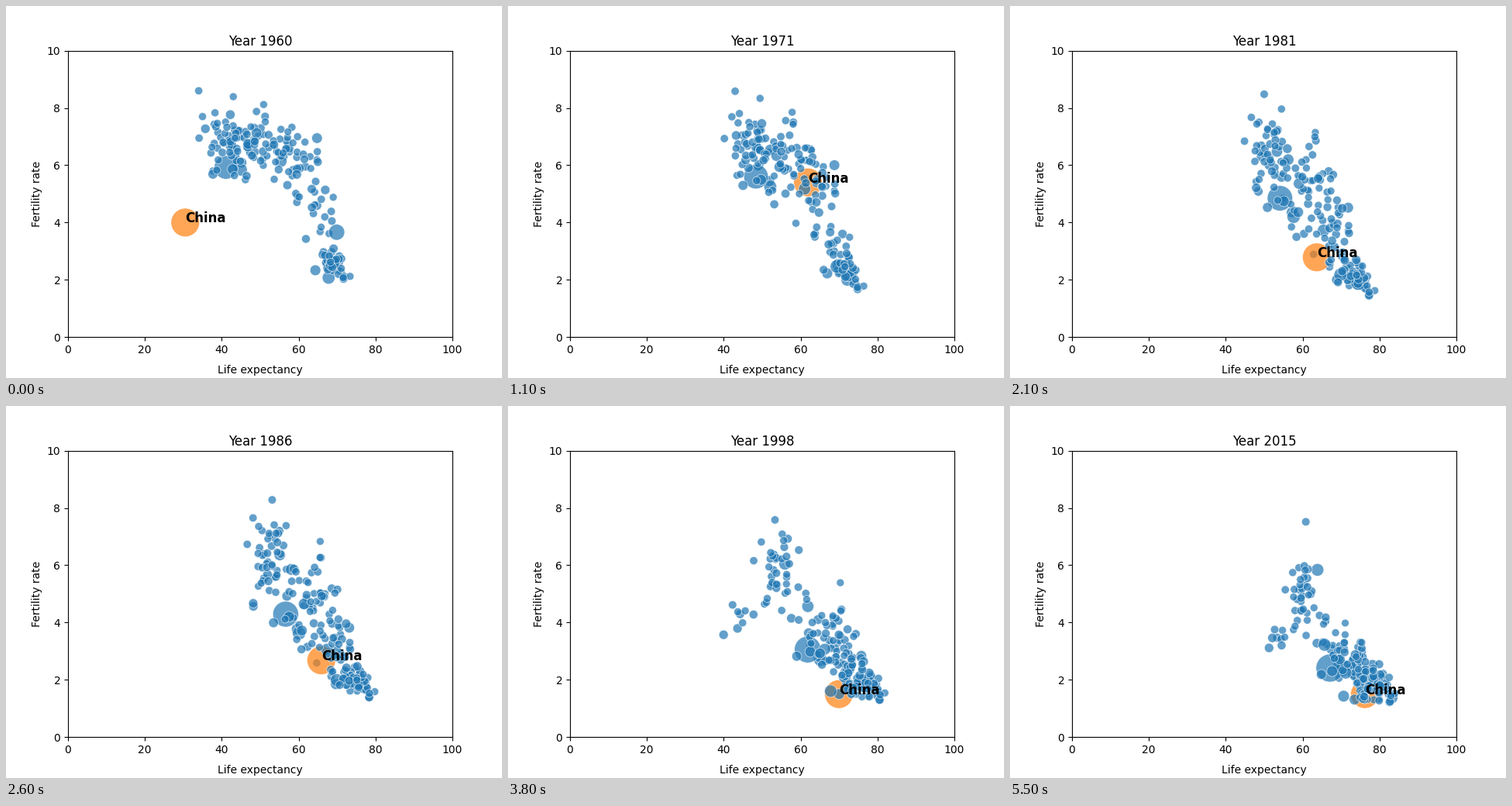
Recreate the animation shown at these times as a matplotlib script. Size 640 by 480 pixels, loop 5600 ms.

```python
import numpy as np
import matplotlib.pyplot as plt
from matplotlib.animation import FuncAnimation

YEARS = np.arange(1960, 2016)
U = np.linspace(0, 1, len(YEARS))
rng = np.random.default_rng(12)

countries = []  # (life, fertility, population share) over YEARS


def ramp(a, b):
    return a + (b - a) * U


def rise(a, b):
    """Growth that slows down towards the end."""
    return a + (b - a) * U * (1.5 - 0.5 * U)


def fall(a, b, mid, width=8):
    """Demographic transition from a to b, halfway in year mid."""
    return a + (b - a) / (1 + np.exp((mid - YEARS) / width))


def dip(depth, year, width):
    return depth * np.exp(-((YEARS - year) / width) ** 2)


def normal():
    return np.clip(rng.normal(), -2.1, 2.1)


def nation(pop, life, fert, loss=0):
    countries.append((life - loss, fert, ramp(*pop)))


def region(n, life, fert, mid, sd, loss=0, pop=0.007):
    """n countries scattered around a shared path, some ahead, some behind."""
    for _ in range(n):
        lag, a, b = normal(), normal(), normal()
        x = rise(*life) + a * ramp(sd, 0.55 * sd) - 0.8 * lag
        y = fall(*fert, mid + 6 * lag) * (1 + ramp(0.08, 0.13) * (b - 0.4 * a))
        share = min(pop * np.exp(1.1 * normal()), 0.075)
        crisis = loss * rng.uniform(0.5, 1.4)
        nation((share, share), x, y, dip(crisis, 2002, 11))


# Africa, with the southern countries hit hardest around 2002
region(36, (41, 60.5), (6.8, 4.6), 2000, 4.6, loss=4)
region(8, (48, 57), (6.8, 3.3), 1988, 3, loss=11)
# South Asia, Middle East, Pacific
region(20, (46, 69.5), (6.6, 2.6), 1986, 5.5, pop=0.012)
region(20, (50, 75), (7.4, 2.6), 1987, 6)
region(9, (54, 69), (6.8, 3.4), 1985, 4, pop=0.002)
# Latin America, early movers
region(30, (58, 74.5), (6.9, 2.2), 1977, 5)
region(20, (64, 77.5), (5.9, 1.8), 1967, 2.5)
# Western and Eastern Europe
region(20, (70, 81.5), (2.8, 1.65), 1970, 1.5, pop=0.02)
region(16, (68, 76), (2.55, 1.45), 1988, 1.8, loss=2, pop=0.012)

# India, United States, Russia, Japan
nation((.66, .955), rise(41.1, 67.1), fall(6.05, 2.3, 1987))
nation((.26, .225), rise(69.9, 79.2), fall(3.9, 1.9, 1966, 3))
nation((.18, .1), rise(68.9, 70.8), fall(2.65, 1.4, 1985), dip(3, 2001, 8))
nation((.14, .09), rise(67.8, 83.3), fall(2.1, 1.35, 1986))
# Indonesia, Brazil, Nigeria, Pakistan, Bangladesh
nation((.13, .188), rise(45, 70.3), fall(6.1, 2.3, 1981))
nation((.11, .15), rise(55.4, 75.5), fall(6.6, 1.75, 1978))
nation((.065, .133), rise(42.3, 64.5), fall(6.7, 5.8, 1990), dip(4.5, 2001, 10))
nation((.065, .138), rise(46.8, 65.7), fall(6.7, 2.9, 1996))
nation((.07, .118), rise(46.9, 71.2), fall(6.9, 2.1, 1987))
# Niger, Yemen, Rwanda, Cambodia
nation((.006, .014), rise(35, 60.9), fall(7.7, 7.5, 1995), dip(3, 1992, 12))
nation((.008, .02), rise(34, 66), fall(8.6, 4, 1999, 5))
nation((.004, .008), rise(43, 66), fall(8.4, 4, 1992, 5), dip(48, 1994, .9))
nation((.009, .011), rise(42, 68), fall(7, 2.6, 1988), dip(34, 1977, 1.4))

rng.shuffle(countries)

CHINA = 30  # place in the drawing order
china_life = np.interp(YEARS, [1960, 1963, 1971, 1977, 1986, 2007, 2015],
                       [30.5, 50.5, 61.9, 61.9, 65.9, 73, 76.2])
china_fert = np.interp(YEARS,
                       [1960, 1961, 1963, 1968, 1971, 1977, 1986, 1998, 2015],
                       [4, 3.3, 7.4, 6.3, 5.4, 2.87, 2.68, 1.5, 1.5])
countries.insert(CHINA, (china_life, china_fert, ramp(1, 1)))

life, fert, share = np.array(countries, dtype=float).transpose(1, 2, 0)
sizes = 50 + 650 * share
colors = ["C0"] * len(countries)
colors[CHINA] = "C1"

fig, ax = plt.subplots(figsize=(6.4, 4.8), dpi=100)
dots = ax.scatter(life[0], fert[0], s=sizes[0], c=colors, alpha=0.7,
                  edgecolors="white", linewidths=0.57)
label = ax.text(0, 0, "China", fontsize=12, fontweight="bold")
title = ax.set_title("", pad=5)
ax.set(xlim=(0, 100), ylim=(0, 10))
ax.set_xlabel("Life expectancy", labelpad=8.5)
ax.set_ylabel("Fertility rate")


def draw(i):
    dots.set_offsets(np.column_stack([life[i], fert[i]]))
    dots.set_sizes(sizes[i])
    label.set_position((life[i, CHINA], fert[i, CHINA]))
    title.set_text(f"Year {YEARS[i]}")
    return dots, label, title


anim = FuncAnimation(fig, draw, frames=len(YEARS), interval=100)
plt.show()
```
